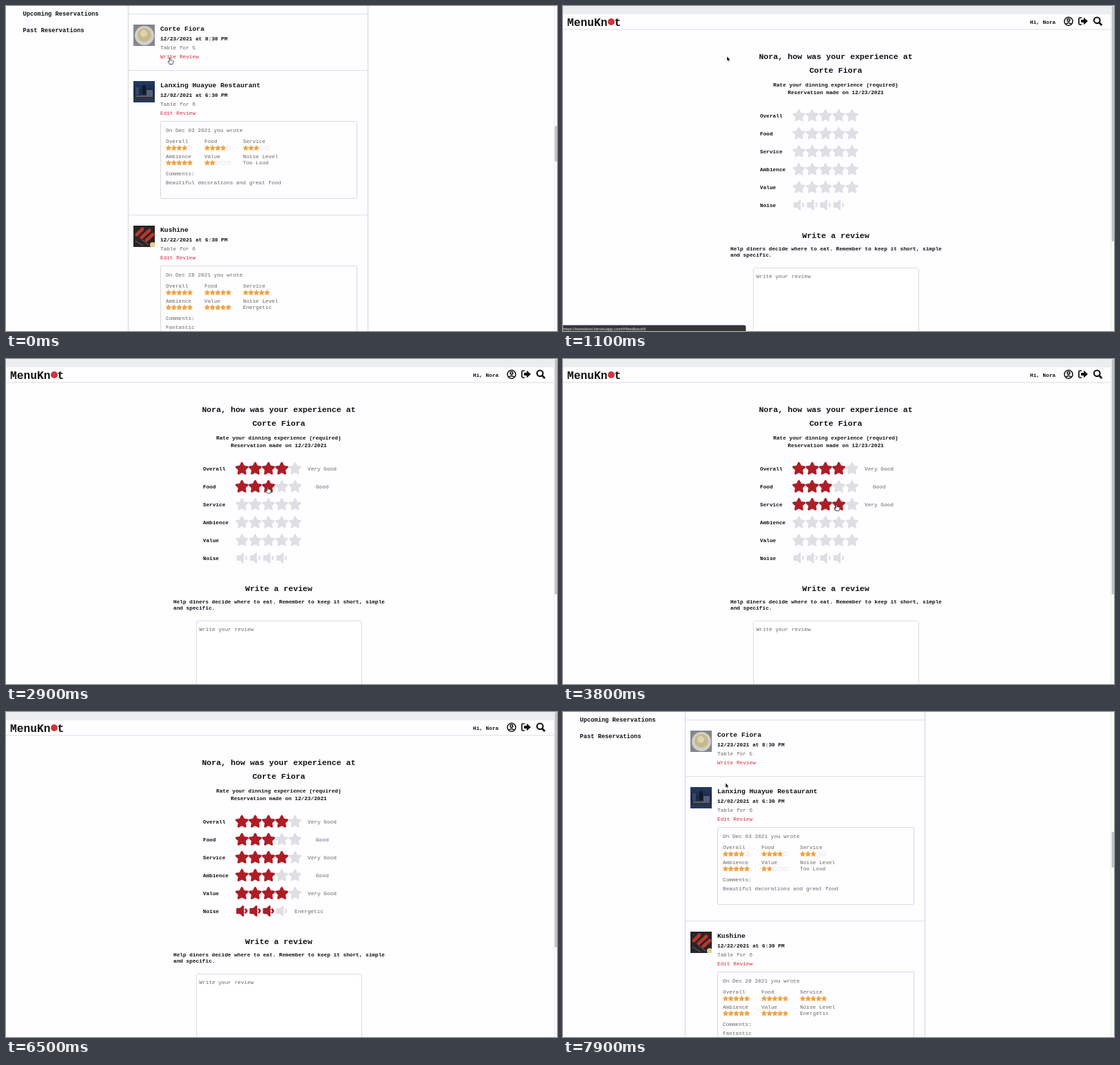
These frames come from a looping animation (800 px wide and 472 px high, 8000 ms). An HTML page:

```html
<!DOCTYPE html>
<html lang="en">
<head>
<meta charset="utf-8">
<title>Restaurant review</title>
<style>
html, body { margin: 0; width: 100%; height: 100%; overflow: hidden; background: #fefdff; }
svg { display: block; width: 800px; height: 472px; }
text { font: 7.76px "Liberation Mono", "Courier New", monospace; fill: #111; white-space: pre; }
.b { font-weight: bold; }
.g { fill: #686868; }
.r { fill: #d42c3c; }
.mid { text-anchor: middle; }
.status { font: 5.85px "Liberation Sans", Arial, sans-serif; fill: #e4e4e4; }
</style>
</head>
<body>
<svg id="stage" viewBox="0 0 800 472">
  <defs>
    <path id="star" d="M-29-238L-94-106-240-85c-26 4-37 36-18 55L-152 73l-25 146c-5 26 23 46 46 33L0 184l131 68c23 13 51-7 46-33L152 73 258-30c19-19 8-51-18-55L94-106 29-238c-12-24-46-24-58 0z"/>
    <path id="speaker" d="M23-184L-66-95H-168a24 24 0 0 0-24 24V73a24 24 0 0 0 24 24H-66L23 186c15 15 41 4 41-17V-167c0-22-26-32-41-17zM146-76c-36-18-60 26-31 42 28 16 28 54 0 70-29 17-4 59 31 42 61-34 61-120 0-154z"/>
    <linearGradient id="night" x2="0" y2="1">
      <stop stop-color="#233c66"/><stop offset=".5" stop-color="#1c2940"/><stop offset="1" stop-color="#2a3a58"/>
    </linearGradient>
  </defs>
  <g id="list"></g>
  <g id="form"></g>
  <g id="status">
    <path d="M0 463.5H263q2.500 0 2.500 2.500V472H0z" fill="#36363a"/>
    <text class="status" x="0" y="470.500">https://menuknot.herokuapp.com/#/feedback/6</text>
  </g>
  <g id="cursor">
    <path id="arrow" d="M0 0V7L1.600 5.600 2.700 8 3.900 7.500 2.800 5.200H4.800z" fill="#000" stroke="#fff" stroke-width=".5"/>
    <path id="hand" d="M-.8.8Q0-.4.8.8V3.600Q1.800 3 2.400 3.900 3.400 3.500 3.800 4.400 4.900 4.200 4.900 5.400 4.900 7.500 3.900 9.500H-.6Q-1.200 8-2.700 6.200-3 4.900-1.700 5.200L-.8 6z" fill="#fff" stroke="#222" stroke-width=".8"/>
  </g>
</svg>
<script>
const $ = id => document.getElementById(id);
const text = (x, y, s, cls = '', size = 7.76) =>
  `<text x="${x}" y="${y}" class="${cls}" style="font-size:${size}px">${s}</text>`;
const rect = (x, y, w, h, fill, more = '') =>
  `<rect x="${x}" y="${y}" width="${w}" height="${h}" fill="${fill}" ${more}/>`;
const icon = (id, x, y, scale, more) =>
  `<use href="#${id}" transform="translate(${x} ${y}) scale(${scale})" ${more}/>`;
const scrollbar = (y, h) =>
  rect(795, 0, 5, 472, '#f9f9fa') + rect(795, 0, .6, 472, '#e6e6e8') +
  rect(796.7, y, 3.3, h, '#c1c1c3', 'rx="1.600"');

// Past reservations
const photos = [
  rect(0, 0, 31, 31, '#85868a') + '<circle cx="16" cy="16" r="14" fill="#cfcfcc"/><circle cx="16" cy="15" r="10" fill="#c8b98a"/><circle cx="15" cy="13" r="5" fill="#ded3ae"/>',
  rect(0, 0, 31, 31, 'url(#night)') + rect(3, 9, 5, 11, '#32486b') + rect(13, 6, 5, 13, '#111a2b') + rect(19, 13, 9, 9, '#53617c') + rect(4, 21, 24, 2, '#6d5b58'),
  rect(0, 0, 31, 31, '#292426') + '<g stroke="#b8372a" stroke-width="5" stroke-linecap="round"><path d="M5 13L13 5M12 17L23 7M19 21L28 13"/></g><path d="M3 22L14 29M12 20L22 28" stroke="#77706c"/><circle cx="28" cy="28" r="4" fill="#e3cf8c"/>'
];

function smallStars(x, y, n) {
  let out = '';
  for (let i = 0; i < 5; i++)
    out += i < n ? icon('star', x + 4 + i * 7.75, y, .0145, 'fill="#f2a342"')
                 : icon('star', x + 4 + i * 7.75, y, .0125, 'fill="#fff" stroke="#d9d9de" stroke-width="44"');
  return out;
}

function entry(y, photo, name, date, guests, review) {
  const body = text(224, 36, name, 'b', 9.7) + text(224, 50, date, 'b') +
    text(224, 62.5, 'Table for ' + guests, 'g') +
    text(224, 75.5, review ? 'Edit Review' : 'Write Review', 'r');
  let card = '';
  if (review) {
    card = rect(224.5, 85.5, 285, 112, 'none', 'stroke="#d9d9dd" rx="1"') +
      text(232, 101, `On ${review.day} you wrote`, 'g');
    ['Overall', 'Food', 'Service', 'Ambience', 'Value'].forEach((label, i) => {
      const x = 232 + i % 3 * 56, row = i > 2 ? 21.5 : 0;
      card += text(x, 117 + row, label, 'g') + smallStars(x, 124 + row, review.stars[i]);
    });
    card += text(344, 138.5, 'Noise Level', 'g') + text(344, 147.5, review.noise, 'g') +
      text(232, 164, 'Comments:', 'g') + text(232, 176.5, review.comment, 'g');
  }
  return `<g transform="translate(0 ${y})">` +
    `<svg x="185" y="27" width="31" height="31">${photos[photo]}</svg>${body}${card}</g>`;
}

$('list').innerHTML =
  text(24.5, 14, 'Upcoming Reservations', 'b', 8.73) + text(24.5, 38, 'Past Reservations', 'b', 8.73) +
  [176.5, 524.5].map(x => rect(x, 0, 2, 472, '#e5e5e8')).join('') +
  [11, 93, 303].map(y => rect(177, y, 348, 1.2, '#e2e2e5')).join('') +
  entry(0, 0, 'Corte Fiora', '12/23/2021 at 8:30 PM', 5) +
  entry(82, 1, 'Lanxing Huayue Restaurant', '12/02/2021 at 6:30 PM', 6,
    { day: 'Dec 03 2021', stars: [4, 4, 3, 5, 2], noise: 'Too Loud', comment: 'Beautiful decorations and great food' }) +
  entry(292, 2, 'Kushine', '12/22/2021 at 6:30 PM', 6,
    { day: 'Dec 28 2021', stars: [5, 5, 5, 5, 5], noise: 'Energetic', comment: 'Fantastic' }) +
  scrollbar(174, 52);

// Review form
const rows = ['Overall', 'Food', 'Service', 'Ambience', 'Value', 'Noise'];
const rowY = i => 159 + i * 26.05;

function ratingRow(label, i) {
  const noise = i === 5;
  let out = text(286, rowY(i) + 3, label, 'b');
  for (let k = 0; k < (noise ? 4 : 5); k++)
    out += icon(noise ? 'speaker' : 'star', 342.5 + k * 19.3, rowY(i) - .3, noise ? .0405 : .0345, `id="i${i}${k}"`);
  return out + `<text id="w${i}" class="g mid" x="${noise ? 440 : 459}" y="${rowY(i) + 3}"></text>`;
}

$('form').innerHTML =
  rect(0, 0, 800, 12, '#ebedef') + rect(0, 33.5, 795, 1.2, '#e3e3e6') +
  text(6, 28.5, 'MenuKn\u00a0t', 'b', 16.3) + '<circle cx="70" cy="23" r="5" fill="#d3343c"/>' +
  text(678, 26, 'Hi, Nora', 'b') +
  `<g fill="none" stroke="#111" stroke-width="1.500">
    <circle cx="734" cy="22.300" r="6"/><circle cx="734" cy="20.500" r="1.900"/><path d="M730 26.500Q734 22.500 738 26.500"/>
    <path d="M753 17H750.500Q749 17 749 18.500V25.500Q749 27 750.500 27H753" stroke-width="1.700"/>
    <path d="M752.500 20.500H756.500V17.500L761.500 22 756.500 26.500V23.500H752.500z" fill="#111" stroke-width="1" stroke-linejoin="round"/>
    <circle cx="775.300" cy="20.800" r="4.300" stroke-width="2.200"/><path d="M778.300 24L782.300 28" stroke-width="2.700"/>
  </g>` +
  text(396, 76.5, 'Nora, how was your experience at', 'b mid', 11.64) +
  text(396, 97, 'Corte Fiora', 'b mid', 11.64) +
  text(396, 116.5, 'Rate your dinning experience (required)', 'b mid') +
  text(396, 128, 'Reservation made on 12/23/2021', 'b mid') +
  rows.map(ratingRow).join('') +
  text(396, 337, 'Write a review', 'b mid', 11.64) +
  text(243, 355, 'Help diners decide where to eat. Remember to keep it short, simple', 'b') +
  text(243, 364, 'and specific.', 'b') +
  rect(276.5, 380.5, 240, 120, '#fff', 'stroke="#dcdce0" rx="2.500"') +
  text(280.5, 395, 'Write your review', 'g') +
  scrollbar(0, 342);

// time, row, rating
const ratings = [[1900, 0, 3], [2200, 0, 4], [2700, 1, 3], [3400, 2, 3], [3500, 2, 4],
  [4200, 3, 4], [4300, 3, 3], [4700, 4, 4], [5200, 5, 3]];

// time, pointer x, pointer y
const path = [[0, 238, 75], [900, 238, 75], [1100, 238, 73], [1400, 238, 73], [1900, 376, 158],
  [2000, 380, 160], [2200, 397, 160], [2500, 397, 162], [2800, 380, 185], [3100, 380, 187],
  [3500, 396, 210], [3800, 397, 211], [4000, 397, 213], [4300, 381, 236], [4500, 381, 240],
  [4800, 398, 262], [5000, 398, 265], [5200, 384, 283], [5400, 385, 282], [5600, 385, 282],
  [6200, 22, 2], [6300, 21, -14], [7300, 21, -14], [7500, 27, 28], [7900, 236, 103], [8000, 236, 103]];

function pointer(t) {
  const i = path.findIndex(p => p[0] > t);
  const [t0, x0, y0] = path[i - 1], [t1, x1, y1] = path[i];
  const u = (t - t0) / (t1 - t0), e = u * u * (3 - 2 * u);
  return [x0 + (x1 - x0) * e, y0 + (y1 - y0) * e];
}

const show = (id, on) => $(id).setAttribute('display', on ? 'inline' : 'none');

function draw(t) {
  const onForm = t >= 900 && t < 6700;
  show('list', !onForm);
  show('form', onForm);
  show('status', t >= 400 && t < 1400);

  const values = rows.map(() => 0);
  for (const [at, row, n] of ratings) if (t >= at) values[row] = n;
  values.forEach((n, i) => {
    for (let k = 0; k < (i === 5 ? 4 : 5); k++) {
      const el = $(`i${i}${k}`), lit = k < n;
      el.setAttribute('fill', lit ? '#b01c26' : '#dfdfe3');
      el.setAttribute('stroke', lit ? '#951a22' : 'none');
      el.setAttribute('stroke-width', 18);
    }
    $('w' + i).textContent = !n ? '' : i === 5 ? 'Energetic' : n === 4 ? 'Very Good' : 'Good';
  });

  const [x, y] = pointer(t);
  const hand = onForm ? x > 333 && x < 430 && y > 150 && y < 297
                      : x > 224 && x < 280 && y > 67 && y < 78;
  $('cursor').setAttribute('transform', `translate(${x} ${y})`);
  show('hand', hand);
  show('arrow', !hand);
}

const start = performance.now();
function tick() {
  draw(Math.floor((performance.now() - start) % 8000 / 100) * 100);
  requestAnimationFrame(tick);
}
tick();
</script>
</body>
</html>
```
